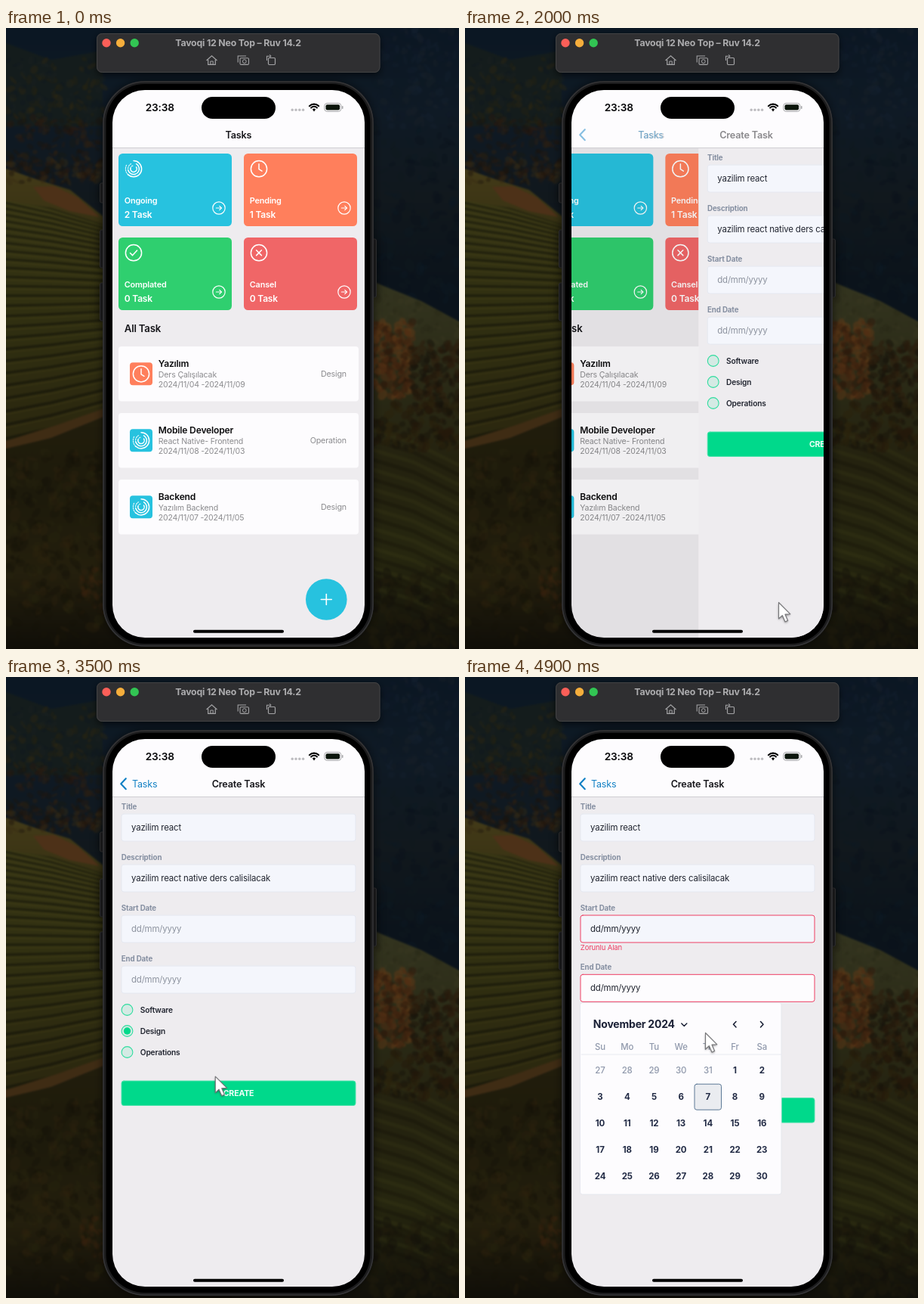
Animation, 600 px wide and 821 px high, one loop 5 s. Source, as an HTML page with a canvas:

```html
<!DOCTYPE html>
<html lang="tr">
<head>
<meta charset="utf-8">
<title>Tasks</title>
<style>
html, body { margin: 0; width: 100%; height: 100%; overflow: hidden; background: #111; }
canvas { display: block; width: 600px; height: 821px; }
</style>
</head>
<body>
<canvas id="stage" width="600" height="821"></canvas>
<script>
const W = 600, H = 821, LOOP = 5000, STEP = 100, TAU = Math.PI * 2;
const stage = document.getElementById('stage');
const backdrop = document.createElement('canvas');
backdrop.width = W;
backdrop.height = H;
let c = backdrop.getContext('2d');

const CYAN = '#27c2df', CORAL = '#ff7f5c', GREEN = '#2fcf6f', RED = '#f06667';
const MINT = '#00d98b', PAPER = '#fdfcfe', BODY = '#eeecef', INK = '#16161a', ERROR = '#ee3e63';
const VALUE = '#20242f';

// ---------- helpers ----------
let seed = 11;
function rnd() {
  seed = (seed * 16807) % 2147483647;
  return seed / 2147483647;
}
function box(x, y, w, h, r, fill, line, lw = 1) {
  c.beginPath();
  c.roundRect(x, y, w, h, r);
  if (fill) { c.fillStyle = fill; c.fill(); }
  if (line) { c.strokeStyle = line; c.lineWidth = lw; c.stroke(); }
}
function disc(x, y, r, fill, line, lw = 1) {
  c.beginPath();
  c.arc(x, y, r, 0, TAU);
  if (fill) { c.fillStyle = fill; c.fill(); }
  if (line) { c.strokeStyle = line; c.lineWidth = lw; c.stroke(); }
}
function path(pts, line, lw) {
  c.beginPath();
  pts.forEach(([x, y], i) => i ? c.lineTo(x, y) : c.moveTo(x, y));
  if (line) { c.strokeStyle = line; c.lineWidth = lw; c.stroke(); }
}
function arc(x, y, r, a, b, line, lw) {
  c.beginPath();
  c.arc(x, y, r, a, b);
  c.strokeStyle = line;
  c.lineWidth = lw;
  c.stroke();
}
function text(str, x, y, size, weight, color, align = 'left') {
  c.font = `${weight} ${size}px Inter, "Noto Sans", sans-serif`;
  c.letterSpacing = `${-0.015 * size}px`;
  c.textAlign = align;
  c.fillStyle = color;
  c.fillText(str, x, y + size * 0.36);
}
function fade(y0, y1, ...stops) {
  const g = c.createLinearGradient(0, y0, 0, y1);
  stops.forEach((s, i) => g.addColorStop(i / (stops.length - 1), s));
  return g;
}
function hill(pts, fill) {
  path(pts);
  c.closePath();
  c.fillStyle = fill;
  c.fill();
}
function leaves(n, x, y, w, h, size, colors, alpha = 0.4) {
  c.globalAlpha = alpha;
  for (let i = 0; i < n; i++) {
    c.fillStyle = colors[Math.floor(rnd() * colors.length)];
    c.beginPath();
    c.ellipse(x + rnd() * w, y + rnd() * h, size * (0.4 + rnd()), size * (0.3 + rnd() * 0.7), rnd() * 3, 0, TAU);
    c.fill();
  }
  c.globalAlpha = 1;
}

// ---------- landscape ----------
function drawLandscape() {
  c.fillStyle = fade(0, 340, '#0b1723', '#0f1a25', '#11181d', '#0b131b');
  c.fillRect(0, 0, W, H);
  hill([[0, 20], [60, 42], [128, 30], [128, 130], [0, 130]], '#141c1c');
  leaves(150, 0, 40, 130, 90, 5, ['#0e1920', '#252412', '#182020', '#2f2712']);
  leaves(150, 0, 118, 132, 85, 5, ['#1c150d', '#2a1a0e', '#181811', '#33210f']);
  leaves(160, 484, 0, 116, 130, 6, ['#0e1a29', '#132030', '#101824', '#182028']);
  leaves(130, 484, 130, 116, 230, 7, ['#0a121c', '#0d1822', '#10191f']);

  hill([[0, 186], [40, 200], [85, 214], [130, 250], [130, 290], [0, 260]], fade(186, 280, '#433a18', '#3c3515', '#302d11'));
  hill([[36, 210], [64, 209], [95, 224], [124, 250], [84, 242], [50, 228]], '#4d3118');
  leaves(70, 0, 172, 130, 32, 5, ['#1c150c', '#2a1c0f', '#382b13']);
  hill([[0, 228], [60, 238], [130, 260], [130, 510], [0, 550]], fade(228, 550, '#353414', '#302f11', '#2b270f'));
  c.save();
  c.clip();
  for (let i = 0; i < 27; i++) {
    const y = 224 + i * 7 + i * i * 0.23, drop = 36 - i * 2.8;
    path([[0, y], [60, y + drop * 0.4], [130, y + drop]], 'rgba(18,17,8,.55)', 2 + i * 0.08);
    path([[0, y + 4], [60, y + 4 + drop * 0.4], [130, y + 4 + drop]], 'rgba(105,90,34,.22)', 1.2);
  }
  c.restore();
  hill([[0, 546], [70, 524], [130, 503], [130, 514], [60, 542], [0, 558]], '#3f2c14');
  hill([[0, 556], [60, 542], [130, 514], [300, 500], [300, H], [0, H]], fade(520, H, '#211d0c', '#1d1a0b', '#241f0d', '#100e08'));
  leaves(280, 0, 562, 134, 250, 7, ['#17150a', '#28240d', '#13110a', '#2e230e'], 0.35);
  leaves(45, 96, 715, 36, 60, 4, ['#40260f', '#33200e', '#221809']);

  hill([[300, 325], [470, 328], [500, 341], [550, 361], [600, 388], [600, H], [300, H]], fade(330, H, '#343520', '#2b2b17', '#24220f', '#26260f', '#11100a'));
  c.save();
  c.clip();
  for (let i = 0; i < 18; i++) {
    const y = 530 + i * 13;
    path([[480, y], [540, y + 18], [600, y + 48]], i % 2 ? 'rgba(17,16,7,.3)' : 'rgba(78,75,28,.16)', 5);
  }
  leaves(90, 484, 345, 116, 75, 5, ['#302f1b', '#3b3722', '#272715'], 0.35);
  leaves(190, 475, 388, 64, 100, 6, ['#4f2d13', '#3f240f', '#5c3716', '#2e1a0c'], 0.55);
  leaves(130, 536, 415, 68, 90, 6, ['#17120a', '#21170b', '#2c1c0d'], 0.5);
  leaves(140, 484, 495, 116, 60, 6, ['#18150a', '#24190b', '#2a220d'], 0.5);
  leaves(120, 484, 715, 116, 106, 8, ['#12110a', '#1a180b', '#201c0c'], 0.45);
  c.restore();

  c.filter = 'blur(1px)';
  c.drawImage(backdrop, 0, 0);
  c.filter = 'none';
}

// ---------- simulator window and device ----------
function drawToolbar() {
  c.save();
  c.shadowColor = 'rgba(0,0,0,.6)';
  c.shadowBlur = 10;
  c.shadowOffsetY = 3;
  box(120, 7, 375.5, 52, 7, '#2f2f31');
  c.restore();
  box(120.5, 7.5, 374.5, 51, 7, null, '#434344');
  ['#fb5f58', '#f5ae3c', '#32c553'].forEach((col, i) => disc(133 + i * 18.6, 19.8, 5.7, col));
  text('Tavoqi 12 Neo Top – Ruv 14.2', 307.5, 19.5, 12.3, 700, '#acacae', 'center');

  const g = '#a3a3a5';
  path([[265.5, 43], [272.5, 36.8], [279.5, 43]], g, 1.2);
  path([[267.7, 42], [267.7, 48.3], [277.3, 48.3], [277.3, 42]], g, 1.2);
  box(270.8, 44, 3.4, 4.3, 0, null, g);
  box(310, 39.8, 11.5, 8.6, 1.5, '#2f2f31', g, 1.1);
  disc(315.8, 44.1, 2.4, null, g);
  path([[307.2, 45.5], [307.2, 37], [318, 37]], g, 1.1);
  box(347.5, 39.5, 9, 9, 1.2, null, g, 1.2);
  path([[345.5, 43], [345.5, 37.3], [351, 37.3]], g, 1.1);
  path([[349, 35.2], [351.2, 37.3], [349, 39.4]], g, 1);
}
function drawDevice() {
  c.save();
  c.shadowColor = 'rgba(0,0,0,.55)';
  c.shadowBlur = 12;
  [[205, 26], [267, 50], [337, 50]].forEach(([y, h]) => box(124.5, y, 6, h, 2, '#202022', '#323234'));
  box(485, 279, 5.5, 77, 2, '#202022', '#323234');
  box(128, 70, 359, 748, 56, '#1c1c1d');
  c.restore();
  box(129, 71, 357, 746, 55, null, '#343436', 1.6);
  box(132.5, 74, 350, 740, 51, '#000');
}

// ---------- icons ----------
function clock(x, y) {
  disc(x, y, 10.6, null, '#fff', 1.5);
  path([[x, y - 6.5], [x, y + 0.5], [x + 4, y + 3]], '#fff', 1.5);
}
function spinner(x, y) {
  [10.6, 7.4, 4.2].forEach((r, i) => {
    const a = -Math.PI / 2 + i * 0.5;
    arc(x, y, r, a, a + 3.9, '#fff', 1.5);
    c.setLineDash([1.6, 1.4]);
    arc(x, y, r, a + 3.9, a + 5.3, 'rgba(255,255,255,.85)', 1.2);
    c.setLineDash([]);
  });
}
function check(x, y) {
  disc(x, y, 10.6, null, '#fff', 1.5);
  path([[x - 4.5, y + 0.3], [x - 1.4, y + 3.4], [x + 4.6, y - 3.2]], '#fff', 1.5);
}
function cross(x, y) {
  disc(x, y, 10.6, null, '#fff', 1.5);
  path([[x - 3.4, y - 3.4], [x + 3.4, y + 3.4]], '#fff', 1.5);
  path([[x + 3.4, y - 3.4], [x - 3.4, y + 3.4]], '#fff', 1.5);
}

// ---------- task list ----------
const cards = [
  [149, 166, CYAN, spinner, 'Ongoing', '2 Task'],
  [315, 166, CORAL, clock, 'Pending', '1 Task'],
  [149, 277, GREEN, check, 'Complated', '0 Task'],
  [315, 277, RED, cross, 'Cansel', '0 Task']
];
const tasks = [
  [CORAL, clock, 'Yazılım', 'Ders Çalışılacak', '2024/11/04 -2024/11/09', 'Design'],
  [CYAN, spinner, 'Mobile Developer', 'React Native- Frontend', '2024/11/08 -2024/11/03', 'Operation'],
  [CYAN, spinner, 'Backend', 'Yazılım Backend', '2024/11/07 -2024/11/05', 'Design']
];
function drawList() {
  c.fillStyle = BODY;
  c.fillRect(141, 158, 434, 650);
  cards.forEach(([x, y, col, icon, name, count]) => {
    box(x, y, 150, 96, 5.5, col);
    icon(x + 20, y + 20.2);
    text(name, x + 7.7, y + 62.5, 10.9, 600, '#fff');
    text(count, x + 7.7, y + 80.5, 12, 600, '#fff');
    const ax = x + 133, ay = y + 72;
    disc(ax, ay, 8.2, null, '#fff', 1.2);
    path([[ax - 3.6, ay], [ax + 3.4, ay]], '#fff', 1.2);
    path([[ax + 0.8, ay - 2.6], [ax + 3.4, ay], [ax + 0.8, ay + 2.6]], '#fff', 1.2);
  });
  text('All Task', 156.8, 397, 13.2, 600, INK);
  tasks.forEach(([col, icon, title, note, dates, kind], i) => {
    const y = 421 + i * 88;
    box(149, y, 318, 72.5, 4, PAPER);
    box(164, y + 21.3, 30, 30, 4, col);
    icon(179, y + 36.3);
    text(title, 201.8, y + 23, 12.1, 600, '#0c0c0e');
    text(note, 201.8, y + 37, 10.6, 400, '#8b8b8e');
    text(dates, 201.8, y + 50.2, 10.5, 400, '#8b8b8e');
    text(kind, 451, y + 36.5, 10.7, 400, '#8b8b8e', 'right');
  });
  disc(424.3, 755.5, 27.3, CYAN);
  path([[417.3, 755.5], [431.3, 755.5]], '#fff', 1.6);
  path([[424.3, 748.5], [424.3, 762.5]], '#fff', 1.6);
}

// ---------- form ----------
function field(label, y, value, color, bad, focused) {
  text(label, 152.8, y, 9.75, 700, '#858fa1');
  box(153, y + 9.5, 310, 36, 3, focused ? PAPER : '#f4f6fc', bad ? ERROR : '#e5e8f0');
  text(value, 166, y + 27.5, 11.45, 400, color);
  if (bad) text('Zorunlu Alan', 152.8, y + 52, 9.5, 400, ERROR);
}
function drawForm(t) {
  const bad = t >= 3800, open = t >= 4600, gap = bad ? 11.3 : 0;
  const hint = bad ? VALUE : '#8d939f';
  c.fillStyle = BODY;
  c.fillRect(141, 158, 434, 650);
  field('Title', 171.5, 'yazilim react', VALUE);
  field('Description', 238.5, 'yazilim react native ders calisilacak', VALUE);
  field('Start Date', 305.5, 'dd/mm/yyyy', hint, bad);
  field('End Date', 372.5 + gap, 'dd/mm/yyyy', hint, bad, open);
  ['Software', 'Design', 'Operations'].forEach((name, i) => {
    const y = 440 + i * 28 + gap * 2;
    disc(160.5, y, 7.4, 'rgba(0,217,139,.11)', '#2fdd9f', 1.1);
    if (i === 1 && t >= 3200) disc(160.5, y, 4.7, MINT);
    text(name, 177.7, y, 10.2, 600, VALUE);
  });
  box(153, 534 + gap * 2, 310, 32.5, 3, MINT, '#4be2ab');
  text('CREATE', 308, 550 + gap * 2, 10.55, 700, '#f2fffa', 'center');
  if (open) drawCalendar();
}
function drawCalendar() {
  box(152.5, 430.5, 266.5, 253.5, 3, PAPER, '#e6e8ee');
  text('November 2024', 169.8, 459, 14, 700, '#1b2136');
  path([[286.8, 458], [290.3, 461.5], [293.8, 458]], '#1b2136', 1.5);
  path([[359, 455.5], [355.5, 459.2], [359, 463]], '#1b2136', 1.6);
  path([[391.5, 455.5], [395, 459.2], [391.5, 463]], '#1b2136', 1.6);
  path([[154, 499], [419, 499]], '#e8eaf0', 1);
  const col = i => 179 + i * 35.7;
  ['Su', 'Mo', 'Tu', 'We', 'Th', 'Fr', 'Sa'].forEach((d, i) => text(d, col(i), 489, 11.4, 500, '#8f98ab', 'center'));
  box(304, 538.2, 35.5, 34, 3, '#eaecf0', '#5c7896');
  for (let i = 0; i < 35; i++) {
    const day = i - 4, past = day < 1;
    text(String(past ? day + 31 : day), col(i % 7), 520 + Math.floor(i / 7) * 35, 11.5,
      past ? 500 : 700, past ? '#8f98ab' : '#222b45', 'center');
  }
}

// ---------- header ----------
function drawHeader(r) {
  const k = 1 - r, back = 167 + 123.5 * r;
  c.fillStyle = PAPER;
  c.fillRect(141, 82, 334, 76);
  c.fillStyle = '#cfced2';
  c.fillRect(141, 158, 334, 1);
  if (r > 0) {
    c.globalAlpha = Math.max(0, 1 - k * 1.6);
    text('Tasks', back, 141, 12.65, 600, INK);
  }
  if (k > 0) {
    c.globalAlpha = k;
    path([[158.8, 134.2], [152.2, 141.2], [158.8, 148.2]], '#1180c4', 2.1);
    text('Tasks', back, 141, 12.5, 400, '#1180c4');
    text('Create Task', 308 + 128 * r, 141, 12.65, 600, INK, 'center');
  }
  c.globalAlpha = 1;

  text('23:38', 203.7, 105, 13.7, 600, '#08080a', 'center');
  box(259, 91, 98, 29, 14.5, '#000');
  for (let i = 0; i < 4; i++) disc(379.2 + i * 4.8, 108.3, 1.7, '#bdbcc0');
  [8.6, 5.4].forEach(q => arc(408, 109.2, q, -2.36, -0.78, '#000', 2.1));
  c.beginPath();
  c.moveTo(408, 110.4);
  c.arc(408, 109.6, 3, -2.36, -0.78);
  c.fillStyle = '#000';
  c.fill();
  box(421.8, 99.5, 22, 10.8, 3.4, null, '#a5a5a8');
  box(423.5, 101.2, 18.6, 7.4, 2, '#0c160c');
  box(445, 103, 1.5, 4, 1, '#a5a5a8');
}

// ---------- motion ----------
const moves = [
  [300, -40, 195], [600, 59, 213], [800, 90, 250], [1500, 399, 696], [1700, 415, 759],
  [2300, 415, 759], [2900, 210, 468], [3200, 210, 468], [3700, 313, 560], [4000, 313, 560],
  [4400, 320, 412], [4600, 320, 412], [4900, 318, 470]
];
function pointer(t) {
  const i = moves.findIndex(m => m[0] >= t);
  if (i < 1) return null;
  const [t0, x0, y0] = moves[i - 1], [t1, x1, y1] = moves[i];
  const u = (t - t0) / (t1 - t0), e = u * u * (3 - 2 * u);
  return [x0 + (x1 - x0) * e, y0 + (y1 - y0) * e];
}
function drawPointer(t) {
  const p = pointer(t);
  if (!p) return;
  c.save();
  c.translate(p[0], p[1]);
  c.shadowColor = 'rgba(0,0,0,.45)';
  c.shadowBlur = 3;
  c.shadowOffsetY = 1.5;
  hill([[0.5, 0.5], [0.5, 22], [5.3, 17.6], [9, 26], [12.6, 24.4], [9, 16.2], [15.8, 15.8]], '#fff');
  c.shadowColor = 'transparent';
  c.strokeStyle = '#77777a';
  c.lineWidth = 1.2;
  c.stroke();
  c.restore();
}
// Share of the push still to travel: a critically damped spring.
function pushLeft(t) {
  if (t <= 1900) return 1;
  if (t >= 2400) return 0;
  const s = (t - 1900) / 60;
  return (1 + s) * Math.exp(-s);
}

function draw(t) {
  const r = pushLeft(t);
  c.drawImage(backdrop, 0, 0);
  c.save();
  c.beginPath();
  c.roundRect(141, 82, 334, 724, 43);
  c.clip();
  if (r > 0) {
    c.save();
    c.translate(-100 * (1 - r), 0);
    drawList();
    c.restore();
    c.fillStyle = `rgba(0,0,0,${0.1 * (1 - r)})`;
    c.fillRect(141, 158, 334, 650);
  }
  if (r < 1) {
    c.save();
    c.translate(334 * r, 0);
    drawForm(t);
    c.restore();
  }
  drawHeader(r);
  box(248, 795.8, 120, 4, 2, '#000');
  c.restore();
  drawPointer(t);
}

drawLandscape();
drawToolbar();
drawDevice();
c = stage.getContext('2d');
c.lineJoin = 'round';
c.lineCap = 'round';

let shown = -1;
function tick() {
  const t = Math.floor((performance.now() % LOOP) / STEP) * STEP;
  if (t !== shown) draw(shown = t);
  requestAnimationFrame(tick);
}
tick();
</script>
</body>
</html>
```
